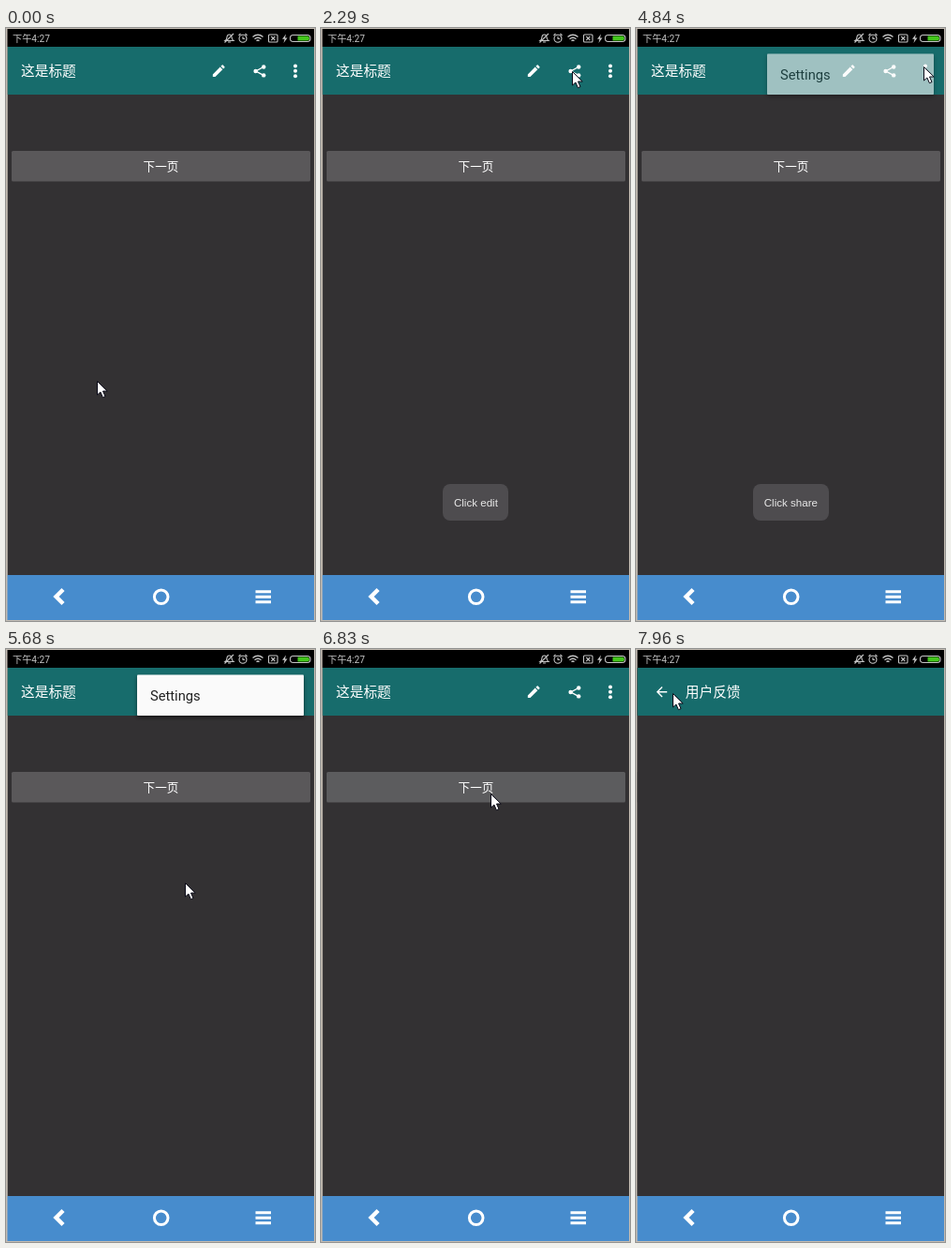
These frames come from a looping animation (330x632 px, 8 s). An HTML page:

```html
<!DOCTYPE html>
<html lang="zh-CN">
<head>
<meta charset="utf-8">
<title>Toolbar demo</title>
<style>
  html, body { margin: 0; width: 100%; height: 100%; overflow: hidden; background: #c3bbb2; }
  svg { display: block; width: 330px; height: 632px; }
  text { fill: #fff; font-family: "Noto Sans CJK SC", "Noto Sans CJK", sans-serif; }
  .title { font-size: 14.7px; }
  .latin { font-family: Roboto, sans-serif; }
  .toast rect { fill: #4e4c4f; }
  .toast text { font: 11.6px "Liberation Sans", Arial, sans-serif; fill: #e8e8e8; text-anchor: middle; }
  .line { fill: none; stroke: #c4c4c4; stroke-width: 1.1; }
</style>
</head>
<body>
<svg viewBox="0 0 330 632">
  <defs>
    <clipPath id="screen"><rect x="1.5" y="20" width="327.5" height="563"/></clipPath>
    <filter id="shadow" x="-10%" y="-20%" width="120%" height="150%">
      <feDropShadow dx="0" dy="2" stdDeviation="2.2" flood-opacity=".55"/>
    </filter>
  </defs>

  <rect x="1.5" y="1" width="327.5" height="19" fill="#000"/>

  <g clip-path="url(#screen)">
    <g id="home">
      <rect x="1.5" y="20" width="328" height="563" fill="#333133"/>
      <rect x="1.5" y="20" width="328" height="51" fill="#176c6c"/>
      <text class="title" x="16" y="51.3">这是标题</text>
      <g fill="#fff">
        <path transform="translate(218.7 37.2) scale(.71)" d="M3 17.25V21h3.75L17.81 9.94l-3.75-3.75zM20.71 7.04c.39-.39.39-1.02 0-1.41l-2.34-2.34c-.39-.39-1.02-.39-1.41 0l-1.83 1.83 3.75 3.75z"/>
        <path d="M275 41.5L266.8 46L275 50.3" fill="none" stroke="#fff" stroke-width="1.4"/>
        <circle cx="275.2" cy="41.5" r="2.2"/><circle cx="266.6" cy="46" r="2.2"/><circle cx="275.2" cy="50.4" r="2.2"/>
        <circle cx="309" cy="40.4" r="2"/><circle cx="309" cy="45.8" r="2"/><circle cx="309" cy="51.2" r="2"/>
      </g>
      <rect id="button" x="6" y="131" width="319" height="32.5" rx="1.5"/>
      <text x="165.5" y="152.2" font-size="12.6" text-anchor="middle">下一页</text>
    </g>
    <circle id="ripple" cy="45.5" r="21.5" fill="#fff"/>
    <rect id="shade" x="1.5" y="20" width="328" height="563"/>
    <g id="page">
      <rect x="1.5" y="20" width="328" height="563" fill="#333133"/>
      <rect x="1.5" y="20" width="328" height="51" fill="#176c6c"/>
      <path d="M33.2 45.7H23M28 40.5L22.8 45.7L28 50.9" fill="none" stroke="#fff" stroke-width="1.4"/>
      <text class="title" x="52.8" y="51.3">用户反馈</text>
    </g>
    <g id="edit" class="toast"><rect x="130" y="486" width="70" height="39" rx="8"/><text x="165.4" y="510">Click edit</text></g>
    <g id="share" class="toast"><rect x="125" y="486" width="81" height="39" rx="8"/><text x="165.4" y="510">Click share</text></g>
    <g id="menu">
      <rect x="140" y="27.5" width="178" height="43.5" rx="1" fill="#fafafa" filter="url(#shadow)"/>
      <text class="latin" x="154" y="55" font-size="14.7" style="fill:#222">Settings</text>
    </g>
  </g>

  <text class="latin" x="7" y="14.6" font-size="10.2" style="fill:#c4c4c4;font-family:Roboto,'Noto Sans CJK SC','Noto Sans CJK',sans-serif">下午4:27</text>
  <g class="line">
    <path d="M234 13.5q2-1.5 2-4q.3-2.5 2.500-2.500t2.500 2.500q0 2.500 2 4zM237 15h3M233.500 15.500L243 6"/>
    <circle cx="253" cy="11.300" r="4"/><path d="M253 9v2.500h2M248.500 8l2-2M257.500 8l-2-2"/>
    <path d="M263.500 9.500q5.500-4.500 11 0M265.500 11.700q3.500-2.800 7 0M267.500 13.600q1.500-1.200 3 0" stroke-width="1.400"/>
    <rect x="280.500" y="7" width="9.500" height="8" rx="1"/><path d="M283.300 9l4 4M287.300 9l-4 4"/>
    <rect x="303.500" y="7.500" width="21.500" height="7" rx="3.200"/>
  </g>
  <path d="M299 6.500l-4 5.200h2.500l-1 4.300 4-5.400h-2.500z" fill="#c4c4c4"/>
  <path d="M311.500 8.500h10q2.500 0 2.500 2.500t-2.500 2.500h-10z" fill="#43c51b"/>

  <rect x="1.5" y="583" width="327.5" height="48" fill="#478ccd"/>
  <g fill="none" stroke="#fff">
    <path d="M61 598.500L53.500 606L61 613.500" stroke-width="4.500"/>
    <circle cx="165.700" cy="606.300" r="7.300" stroke-width="3"/>
    <path d="M266.500 600.800h16.500M266.500 606.300h16.500M266.500 611.800h16.500" stroke-width="3"/>
  </g>

  <path id="cursor" d="M.5 .5V15L3.900 12L6.400 17.700L9 16.600L6.500 11H11.200Z" fill="#fff" stroke="#0a0a18"/>
</svg>
<script>
const LOOP = 8000;
// The screen only refreshes at these moments.
const ticks = [0, 470, 610, 760, 900, 1040, 1440, 1580, 1720, 1870, 2010, 2150, 2290,
  2600, 2750, 3570, 3720, 3860, 4000, 4130, 4260, 4840, 4990, 5260, 5410, 5540, 5680,
  5830, 5980, 6130, 6280, 6400, 6680, 6830, 6980, 7100, 7250, 7680, 7830, 7960];

// Cursor legs: start, end, target x, target y.
const legs = [
  [330, 1040, 231, 28],
  [1870, 2290, 268, 46],
  [3720, 4260, 307, 41],
  [5130, 5680, 191, 249],
  [5980, 6280, 183, 161],
  [6280, 6400, 181, 154],
  [7540, 7960, 38.500, 47]
];

const $ = id => document.getElementById(id);
const [home, button, ripple, shade, page, edit, share, menu, cursor] =
  ["home", "button", "ripple", "shade", "page", "edit", "share", "menu", "cursor"].map($);

const ramp = (t, from, to) => Math.min(1, Math.max(0, (t - from) / (to - from)));
const smooth = p => p * p * (3 - 2 * p);
const within = (t, from, to) => t >= from && t < to;
const move = (el, x, y) => el.setAttribute("transform", `translate(${x} ${y})`);
const fade = (el, a) => el.setAttribute("opacity", a);

function cursorAt(t) {
  let x = 96.500, y = 376;
  for (const [from, to, tx, ty] of legs) {
    const p = smooth(ramp(t, from, to));
    x += (tx - x) * p;
    y += (ty - y) * p;
  }
  return [x, y];
}

function drawToast(el, t, start, end) {
  const p = ramp(t, start, start + 200);
  move(el, 0, 24 * (1 - p));
  fade(el, p * (1 - ramp(t, end, end + 200)));
}

function draw(t) {
  move(cursor, ...cursorAt(t).map(Math.round));

  drawToast(edit, t, 1440, 3470);
  drawToast(share, t, 3470, 5470);

  const onEdit = within(t, 1440, 1580), onShare = within(t, 2600, 2750);
  ripple.setAttribute("cx", onEdit ? 227 : 271);
  fade(ripple, onEdit || onShare ? 0.2 : 0);

  fade(menu, ramp(t, 4720, 4920) * (1 - ramp(t, 5750, 5910)));
  button.setAttribute("fill", t >= 6680 ? "#5c5c5e" : "#5a585a");

  const left = (1 - ramp(t, 6841, 7241)) ** 3;
  move(page, 328 * left, 0);
  move(home, -98 * (1 - left), 0);
  fade(shade, 0.62 * (1 - left));
}

const origin = performance.now();
function loop() {
  const t = (performance.now() - origin) % LOOP;
  draw(ticks.findLast(tick => tick <= t) ?? 0);
  requestAnimationFrame(loop);
}
loop();
</script>
</body>
</html>
```
